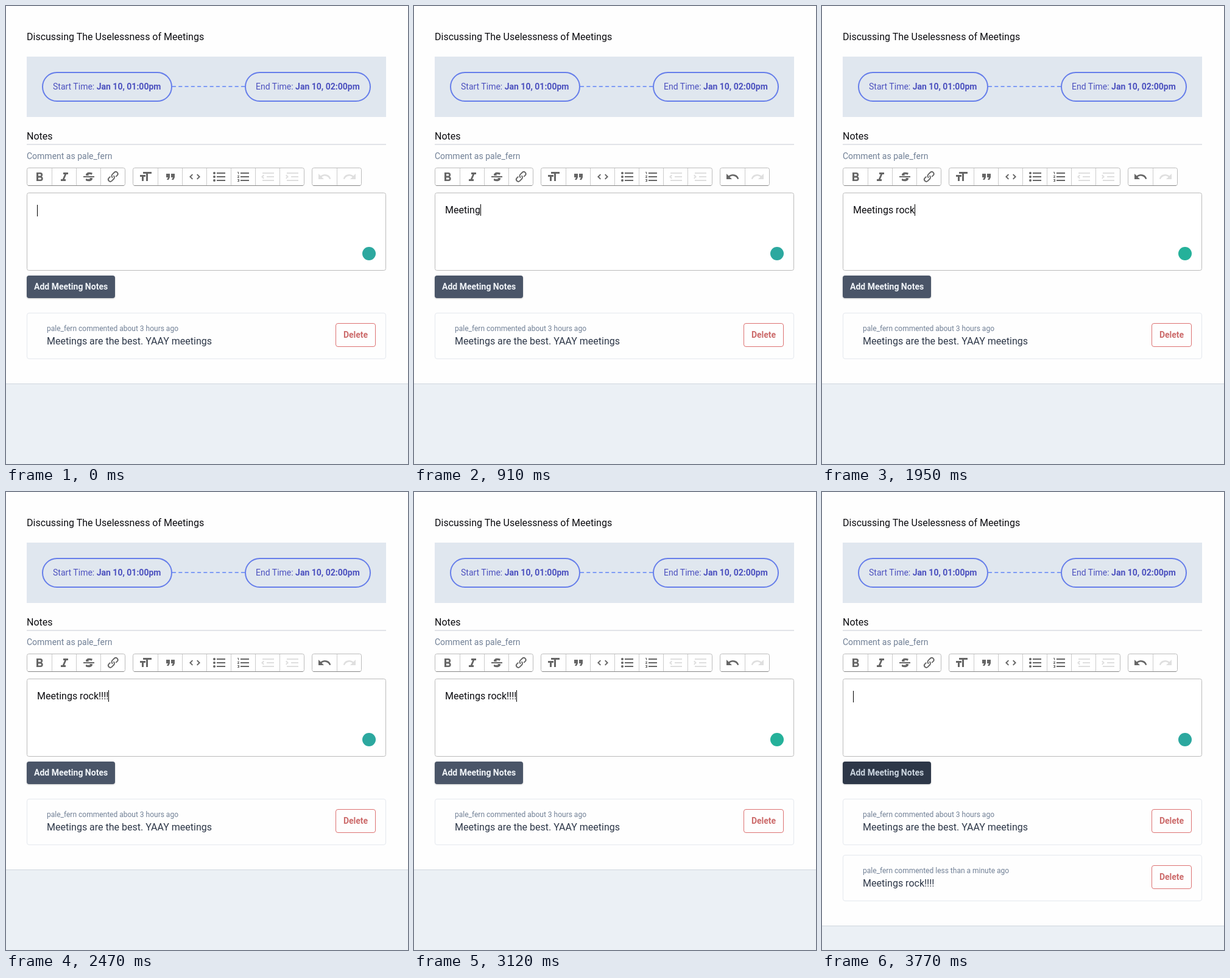
Animation, 660 px wide and 751 px high, one loop 4290 ms. Source, as an HTML page:

```html
<!DOCTYPE html>
<html lang="en">
<head>
<meta charset="utf-8">
<title>Meeting notes</title>
<style>
html, body { margin: 0; width: 100%; height: 100%; overflow: hidden; background: #ebf0f5; }
svg { display: block; }
text { font: 16px Roboto, sans-serif; fill: #0c0c10; white-space: pre; }
.s14 { font-size: 14px; }
.bold { font-size: 14px; font-weight: 700; }
.grey { fill: #718096; }
.meta { font-size: 12px; fill: #718096; }
.body { fill: #2d3748; }
.time { font-size: 14px; fill: #4c51bf; }
.time tspan { font-weight: 700; }
.pill { fill: none; stroke: #667eea; stroke-width: 2; }
.card { fill: #fefefe; stroke: #e4e8ee; }
.del { fill: #fefefe; stroke: #dd7272; }
.delText { fill: #cc6b6b; text-anchor: middle; }
.frame { fill: #fff; stroke: #bbb; }
.icon { fill: #666; }
.icon.off { fill: #dfdfdf; }
.line { fill: none; stroke: #666; stroke-width: 1.9; stroke-linecap: round; }
#add rect { fill: #4a5568; }
#add text { fill: #f1f5f9; }
#add.hover rect { fill: #2d3748; }
#add.hover text { fill: #cbd5e0; }
#add { filter: drop-shadow(0 1px 1px rgba(0, 0, 0, .2)); }
</style>
</head>
<body>
<svg width="660" height="751" viewBox="0 0 660 751">
  <defs>
    <g id="comment">
      <rect class="card" x="34.5" y="503.5" width="589" height="75" rx="3.5"/>
      <rect class="del" x="541.5" y="520.5" width="65" height="38" rx="3.5"/>
      <text class="bold delText" x="574" y="544">Delete</text>
    </g>
  </defs>

  <g id="page">
    <rect y="-132" width="660" height="751" fill="#fefefe"/>
    <rect y="619" width="660" height="1" fill="#cfd6de"/>
  </g>

  <text x="34" y="56">Discussing The Uselessness of Meetings</text>
  <rect x="34" y="83" width="590" height="99" fill="#e0e7ef"/>
  <rect class="pill" x="60" y="109" width="212" height="47" rx="23.5"/>
  <rect class="pill" x="393" y="109" width="205" height="47" rx="23.5"/>
  <path d="M273 132h119" stroke="#7f9cf5" stroke-width="2" stroke-dasharray="6 4.27"/>
  <text class="time" x="77" y="137">Start Time: <tspan>Jan 10, 01:00pm</tspan></text>
  <text class="time" x="410" y="137">End Time: <tspan>Jan 10, 02:00pm</tspan></text>

  <text x="34" y="219">Notes</text>
  <rect x="34" y="226" width="590" height="2" fill="#e2e4e8"/>
  <text class="s14 grey" x="34" y="251">Comment as pale_fern</text>

  <g id="bars"></g>

  <g class="icon" transform="translate(43 268)"><path d="M15.6 11.8c1-.7 1.6-1.8 1.6-2.8a4 4 0 0 0-4-4H7v14h7c2.1 0 3.7-1.7 3.7-3.8 0-1.5-.8-2.8-2.1-3.4zM10 7.5h3a1.5 1.5 0 1 1 0 3h-3zm3.5 9H10v-3h3.5a1.5 1.5 0 1 1 0 3z"/></g>
  <g class="icon" transform="translate(84 268)"><path d="M10 5v3h2.2l-3.4 8H6v3h8v-3h-2.2l3.4-8H18V5z"/></g>
  <g class="icon" transform="translate(124 268)"><path d="M12.7 14c.7.3 1.1.6 1.1 1.1 0 .7-.7 1-1.9 1-1.7 0-3.4-.4-4.9-1.1v3.3c1.4.6 3 .9 4.8.9 3.8 0 6.2-1.7 6.2-4.5l-.1-.7zM7.2 10c-.7-3.2 1.8-5.2 5.8-5.2 1.6 0 3.3.3 5 1l-1.3 2.9c-1.5-.6-2.7-.9-3.8-.9-1.6 0-2.1 1-1.1 1.7l1 .5zM3 13h18v-2H3z"/></g>
  <g class="line" transform="translate(164 268)"><path d="M10.5 13a3.4 3.4 0 0 1 0-4.8l3.4-3.4a3.4 3.4 0 0 1 4.8 4.8l-2 1.8M6.8 12.2l-2 1.9a3.4 3.4 0 0 0 4.8 4.8l3.4-3.4a3.4 3.4 0 0 0 0-4.8"/></g>

  <g class="icon" transform="translate(217 268)"><path d="M12 9v3H9v7H6v-7H3V9zM8 4h14v3h-6v12h-3V7H8z"/></g>
  <g class="icon" transform="translate(258 268)"><path d="M6 17h3l2-4V7H5v6h3zm8 0h3l2-4V7h-6v6h3z"/></g>
  <g class="icon" transform="translate(298 268)"><path d="M18.2 12L15 15.2l1.4 1.4L21 12l-4.6-4.6L15 8.8zM5.8 12L9 8.8 7.6 7.4 3 12l4.6 4.6L9 15.2z"/></g>
  <g class="icon" transform="translate(338 268)"><circle cx="4" cy="6" r="2"/><circle cx="4" cy="12" r="2"/><circle cx="4" cy="18" r="2"/><path d="M8 5h14v2H8zm0 6h14v2H8zm0 6h14v2H8z"/></g>
  <g class="icon" transform="translate(378 268)"><path d="M2 17h2v.5H3v1h1v.5H2v1h3v-4H2zm1-9h1V4H2v1h1zm-1 3h1.8L2 13.1v.9h3v-1H3.2L5 10.9V10H2zM7 5h14v2H7zm0 6h14v2H7zm0 6h14v2H7z"/></g>
  <g class="icon off" transform="translate(418 268)"><path d="M3 5h19v2H3zm7 6h12v2H10zm-7 6h19v2H3zM1 12l3.6-3.5L6 10l-2 2 2 2.2-1.5 1.4z"/></g>
  <g class="icon off" transform="translate(458 268)"><path d="M3 5h19v2H3zm7 6h12v2H10zm-7 6h19v2H3zM6 12l-3.5-3.5L1 9.9 3.1 12 1 14.2l1.4 1.4z"/></g>

  <g class="icon" id="undo" transform="translate(511 268)"><path d="M12.5 8c-2.6 0-5 1-6.9 2.6L2 7v9h9l-3.6-3.6A8 8 0 0 1 20 16l2.4-.8a10.5 10.5 0 0 0-9.9-7.2z"/></g>
  <g class="icon off" transform="translate(576 268) scale(-1 1)"><path d="M12.5 8c-2.6 0-5 1-6.9 2.6L2 7v9h9l-3.6-3.6A8 8 0 0 1 20 16l2.4-.8a10.5 10.5 0 0 0-9.9-7.2z"/></g>

  <rect class="frame" x="34.5" y="306.5" width="589" height="127" rx="3"/>
  <text id="draft" x="51" y="340"></text>
  <rect id="caret" x="51" width="1" height="19"/>
  <circle id="badge" cx="596" cy="406" r="11"/>

  <g id="add">
    <rect x="34" y="442" width="145" height="37" rx="4"/>
    <text class="bold" x="46" y="465">Add Meeting Notes</text>
  </g>

  <use href="#comment"/>
  <text class="meta" x="67" y="533">pale_fern commented about 3 hours ago</text>
  <text class="body" x="67" y="555">Meetings are the best. YAAY meetings</text>

  <g id="posted" transform="translate(0 92)">
    <use href="#comment"/>
    <text class="meta" x="67" y="533">pale_fern commented less than a minute ago</text>
    <text class="body" x="67" y="555">Meetings rock!!!!</text>
  </g>
</svg>
<script>
const $ = id => document.getElementById(id);
const LOOP = 4290, HOVER = 3380, POST = 3770;
const NOTE = 'Meetings rock!!!!';

// [time, characters typed so far]
const KEYS = [[130, 1], [260, 3], [520, 4], [650, 5], [780, 6], [910, 7], [1040, 8],
  [1170, 10], [1430, 11], [1560, 12], [1690, 13], [2080, 14], [2210, 15], [2340, 17]];

// Toolbar groups: left edge, width, divider positions
function bar(x, w, first, count) {
  let s = `<rect class="frame" x="${x + .5}" y="265.5" width="${w - 1}" height="29" rx="3"/>` +
    `<path d="M${x + 2.5} 294.5h${w - 5}" stroke="#888"/>`;
  for (let i = 0; i < count; i++) s += `<path d="M${first + 40 * i + .5} 266v28" stroke="#ccc"/>`;
  return s;
}
$('bars').innerHTML = bar(34, 162, 75, 3) + bar(208, 282, 249, 6) + bar(502, 82, 543, 1);

const between = (t, a, b) => t >= a && t < b;
let start;

function draw(now) {
  start ??= now;
  const t = (now - start) % LOOP;
  const posted = t >= POST;
  const typed = KEYS.reduce((n, [at, len]) => t >= at ? len : n, 0);
  const shown = posted ? 0 : typed;
  const draft = $('draft');

  draft.textContent = NOTE.slice(0, shown);
  $('caret').setAttribute('x', 51 + Math.round(shown ? draft.getComputedTextLength() : 0));
  $('caret').setAttribute('y', shown ? 325 : 326);
  $('undo').classList.toggle('off', !typed);
  $('add').classList.toggle('hover', t >= HOVER);
  const busy = between(t, 1690, 2080) || between(t, 2730, HOVER);
  $('badge').setAttribute('fill', busy ? '#25b19a' : '#2ca89f');
  $('posted').style.display = posted ? '' : 'none';
  $('page').setAttribute('transform', `translate(0 ${posted ? 92 : 0})`);
  requestAnimationFrame(draw);
}
requestAnimationFrame(draw);
</script>
</body>
</html>
```
